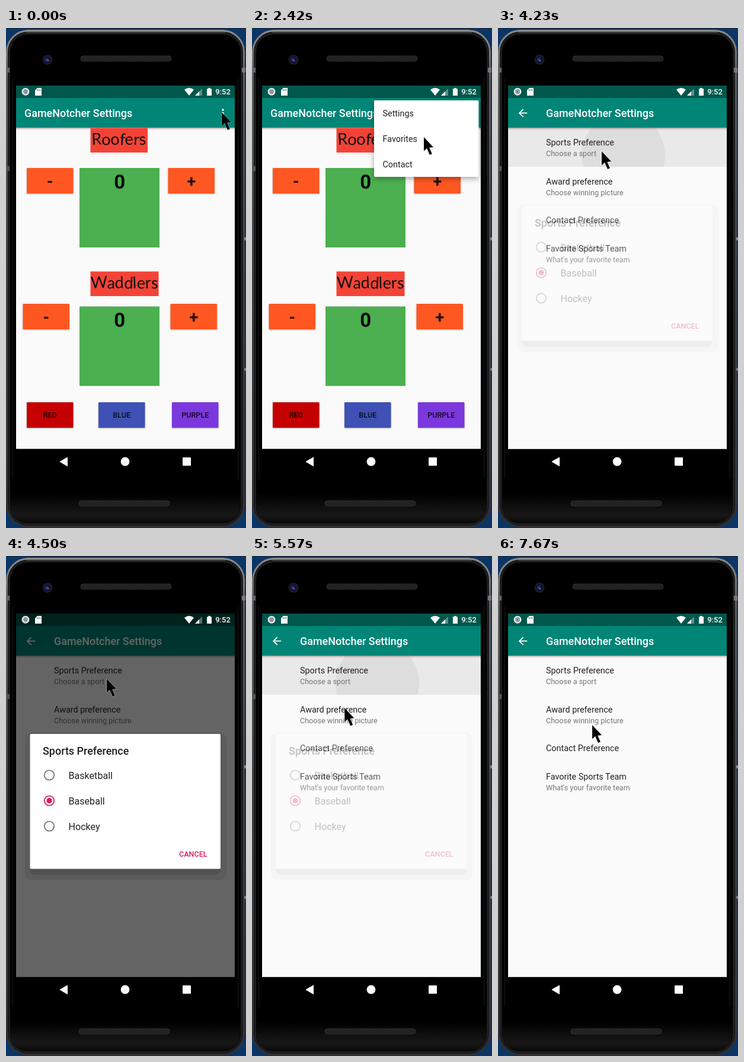
An HTML page that plays this animation: 405x843 px, repeating every 8000 ms.

```html
<!DOCTYPE html>
<html lang="en">
<head>
<meta charset="utf-8">
<title>Score app settings</title>
<style>
html, body { margin: 0; width: 100%; height: 100%; overflow: hidden; background: #0a3566; }
svg { display: block; width: 100%; height: 100%; }
text { font-family: Roboto, "Noto Sans", sans-serif; white-space: pre; }
.raised { filter: drop-shadow(0 1.5px 1.2px rgba(0,0,0,.32)); }
.popup { filter: drop-shadow(0 3px 5px rgba(0,0,0,.34)); }
.hand { font-family: Lato, "Open Sans", sans-serif; }
</style>
</head>
<body>
<svg viewBox="0 0 405 843" preserveAspectRatio="none">
  <defs>
    <linearGradient id="rim" x2="0" y2="1">
      <stop offset="0" stop-color="#8c8c8e"/>
      <stop offset=".1" stop-color="#5c5c5e"/>
      <stop offset=".5" stop-color="#404042"/>
      <stop offset="1" stop-color="#303032"/>
    </linearGradient>
    <linearGradient id="base" x2="0" y2="1">
      <stop offset="0" stop-color="#000"/>
      <stop offset=".7" stop-color="#171717"/>
      <stop offset="1" stop-color="#0a0a0a"/>
    </linearGradient>
    <linearGradient id="barShade" x2="0" y2="1">
      <stop offset="0" stop-opacity=".3"/>
      <stop offset="1" stop-opacity="0"/>
    </linearGradient>
    <pattern id="mesh" width="4" height="4" patternUnits="userSpaceOnUse">
      <rect width="4" height="4" fill="#2c2c2c"/>
      <path d="M0 0L4 4M4 0L0 4" stroke="#151515" stroke-width=".9"/>
    </pattern>
    <clipPath id="glass"><rect x="17" y="97" width="369" height="646"/></clipPath>
    <clipPath id="menuClip"><rect id="menuBox" x="190" y="110" width="210" height="170"/></clipPath>
    <clipPath id="row"><rect x="17" y="168" width="369" height="66"/></clipPath>
  </defs>
  <g id="phone"></g>
  <g clip-path="url(#glass)">
    <g id="main"></g>
    <g clip-path="url(#menuClip)"><g id="menu"></g></g>
    <g id="prefs"></g>
    <rect id="dim" x="17" y="97" width="369" height="613"/>
    <g id="dialog"></g>
  </g>
  <g id="system"></g>
  <path id="cursor" d="M0 0V23.5L5 18.8L10 30L13.8 28.3L9.2 17.8L16 17Z" stroke="#fff" stroke-width=".7" paint-order="stroke"/>
</svg>
<script>
const LOOP = 8000;
const el = id => document.getElementById(id);
const attrs = o => Object.entries(o).map(([k, v]) => ` ${k}="${v}"`).join('');
const rect = (x, y, w, h, fill, o = {}) =>
  `<rect x="${x}" y="${y}" width="${w}" height="${h}" fill="${fill}"${attrs(o)}/>`;
const circle = (x, y, r, fill, o = {}) =>
  `<circle cx="${x}" cy="${y}" r="${r}" fill="${fill}"${attrs(o)}/>`;
const path = (d, fill, o = {}) => `<path d="${d}" fill="${fill}"${attrs(o)}/>`;
const text = (s, x, y, size, fill = '#212121', o = {}) =>
  `<text x="${x}" y="${y}" font-size="${size}" fill="${fill}"${attrs(o)}>${s}</text>`;

const MEDIUM = { 'font-weight': 500 };
const MID = { 'text-anchor': 'middle' };
const TITLE = 'GameNotcher Settings';
const PINK = '#d81b60';

function appBar(titleX) {
  return rect(17, 97, 369, 612.6, '#fafafa') + rect(17, 97, 369, 21, '#00574b') +
    rect(17, 118, 369, 50, '#008577') + rect(17, 168, 369, 4, 'url(#barShade)') +
    text(TITLE, titleX, 150, 17.95, '#fff', MEDIUM);
}

function button(x, y, fill, label, bold) {
  const style = { ...MID, 'font-weight': bold ? 700 : 500 };
  return rect(x, y, 78.5, 43, fill, { class: 'raised', rx: 1 }) +
    text(label, x + 39.3, y + (bold ? 31.5 : 26), bold ? 27 : 12.57, 'rgba(0,0,0,.85)', style);
}

function team(y, name, width, scoreY, minusX, plusX, buttonY) {
  return rect(142.5, y, width, 41.5, '#f44336') +
    text(name, 142.5 + width / 2, y + 28.5, 27.2, '#111',
      { ...MID, class: 'hand', rotate: '-3 2 -2 3 -2 2 -2 2' }) +
    rect(124, scoreY, 135, 134, '#4caf50') +
    text('0', 191.7, scoreY + 34.5, 33, '#0a0a0a', { ...MID, 'font-weight': 700 }) +
    button(minusX, buttonY, '#ff5722', '-', true) +
    button(plusX, buttonY, '#ff5722', '+', true);
}

function drawPhone() {
  const speaker = (x, y) => rect(x, y, 153, 9, 'url(#mesh)', { rx: 4, stroke: '#333', 'stroke-width': .8 });
  el('phone').innerHTML =
    rect(0, 0, 405, 843, '#0a3566') +
    rect(0, 0, 405, 1, '#1b2430') +
    rect(0, 3, 403, 839, '#19191a', { rx: 38 }) +
    rect(1.5, 4.5, 400, 836, 'none', { rx: 36, stroke: 'url(#rim)', 'stroke-width': 3 }) +
    path('M34 7H371', 'none', { stroke: '#777', 'stroke-width': 1.2 }) +
    rect(6, 10, 391, 826, '#000', { rx: 31, stroke: '#303032' }) +
    path('M7 785H396V800Q396 835 361 835H42Q7 835 7 800Z', 'url(#base)') +
    path('M11.5 85V760M391.5 85V760', 'none', { stroke: '#1a1a1a' }) +
    rect(0, 67, 6, 8, '#666') + rect(0, 233, 6, 8, '#555') + rect(398, 67, 6, 8, '#777') +
    rect(402, 353, 3, 5, '#888') + rect(402, 573, 3, 5, '#777') +
    speaker(126, 47) + speaker(123, 797) +
    circle(70, 53.5, 8.5, '#1b1b20') + circle(69.5, 53.5, 5.5, '#11132c') +
    circle(69, 53.5, 2.8, '#28329a') + circle(71, 55, 1, '#8d93dd');
}

function drawMain() {
  el('main').innerHTML = appBar(31) +
    [138, 143.5, 149].map(y => circle(366, y, 1.8, '#fff')).join('') +
    team(168.5, 'Roofers', 96.5, 236, 35, 273.5, 236) +
    team(410.5, 'Waddlers', 115, 469.5, 28.5, 277.5, 465) +
    button(35, 631, '#c50000', 'RED') +
    button(156, 631, '#3f51b5', 'BLUE') +
    button(280, 631, '#7b38dd', 'PURPLE');
  el('menu').innerHTML = rect(206, 122, 176.5, 129, '#fff', { rx: 2, class: 'popup' }) +
    ['Settings', 'Favorites', 'Contact'].map((s, i) => text(s, 220.5, 148.7 + 43 * i, 14.37)).join('');
}

function drawPrefs() {
  const item = (y, title, note) => text(title, 81, y, 14.37) +
    (note ? text(note, 81, y + 18, 12.57, '#757575') : '');
  el('prefs').innerHTML = appBar(81) +
    path('M20 11H7.83l5.59-5.59L12 4l-8 8 8 8 1.41-1.41L7.83 13H20v-2z', '#fff',
      { transform: 'translate(31.2 132.6) scale(.898)' }) +
    `<g id="press" clip-path="url(#row)">${rect(17, 168, 369, 66, 'rgba(0,0,0,.065)')}` +
    `${circle(211.5, 214, 70.5, 'rgba(0,0,0,.05)')}</g>` +
    item(198, 'Sports Preference', 'Choose a sport') +
    item(263.5, 'Award preference', 'Choose winning picture') +
    item(329, 'Contact Preference') +
    item(377.3, 'Favorite Sports Team', "What's your favorite team");
}

function drawDialog() {
  const options = ['Basketball', 'Baseball', 'Hockey'].map((s, i) => {
    const y = 369.5 + 43 * i;
    const picked = i === 1;
    return circle(73, y, 8.2, 'none', { stroke: picked ? PINK : '#757575', 'stroke-width': 1.8 }) +
      (picked ? circle(73, y, 4.6, PINK) : '') + text(s, 105.5, y + 6, 16.1);
  }).join('');
  el('dialog').innerHTML =
    rect(32, 298, 340, 248.5, 'rgba(0,0,0,.08)', { rx: 11 }) +
    rect(40.5, 304, 321, 233.5, 'rgba(0,0,0,.12)', { rx: 8 }) +
    rect(40.5, 300, 321.5, 227.5, '#fff', { rx: 2 }) +
    text('Sports Preference', 62, 335, 17.95, '#212121', MEDIUM) +
    options + text('CANCEL', 292, 507, 12.57, PINK, MEDIUM);
}

function drawSystem() {
  const white = '#fff';
  el('system').innerHTML =
    circle(33, 107.3, 5.3, '#8a9aa3', { stroke: '#eef3f3', 'stroke-width': 2.2 }) +
    path('M53 101H60V114H49V105Z', white) +
    path('M52.5 103.5v2.5M55 103.5v2.5M57.5 103.5v2.5', 'none', { stroke: '#00574b' }) +
    path('M301 104Q309 98 317 104L309 114Z', white) +
    path('M319 114L331 102V114Z', 'rgba(255,255,255,.35)') +
    path('M319 114L326 107V114Z', white) +
    path('M339 102.5H341.3V101H344.7V102.5H347V114H339Z', white) +
    text('9:52', 353.2, 112, 13, white, MEDIUM) +
    path('M103.5 724V738.5L91 731.2Z', white, { stroke: white, 'stroke-linejoin': 'round' }) +
    circle(201, 731, 7.4, white) + rect(298, 724, 14, 14, white, { rx: 1 });
}

const ramp = (t, a, b) => Math.min(1, Math.max(0, (t - a) / (b - a)));
const mix = (a, b, u) => a + (b - a) * u;

// The screen refreshes in steps of about 131 ms.
const STEP = 131;
const stepTime = t => 710 + STEP * Math.floor((t - 675) / STEP);

// Pointer strokes: start, end, and where each one arrives.
const START = [364, 142];
const strokes = [
  [600, 710, 347, 141], [850, 1234, 305, 161], [1234, 1365, 291, 190],
  [1889, 2151, 231, 183], [2151, 2413, 290, 184], [2900, 3460, 217, 210],
  [4120, 4240, 175, 208], [4250, 4509, 170, 207], [5300, 5426, 164, 212],
  [5430, 6120, 122, 453], [7300, 7640, 159, 285]
];
const MENU_OPEN = 790, PREFS_OPEN = 2660;
const dialogs = [[4210, 4540], [5520, 6590]];

function pointer(t) {
  let [x, y] = START;
  for (const [from, to, endX, endY] of strokes) {
    const u = ramp(t, from, to);
    x = mix(x, endX, u);
    y = mix(y, endY, u);
  }
  return [x, y];
}

function render(time) {
  const t = stepTime(time);
  const set = (id, name, value) => el(id).setAttribute(name, value);
  const [x, y] = pointer(t);
  set('cursor', 'transform', `translate(${x} ${y})`);

  const menu = ramp(t, MENU_OPEN, MENU_OPEN + 260);
  set('menu', 'opacity', t < PREFS_OPEN ? menu : 0);
  set('menuBox', 'height', 170 * menu);

  const slide = 1 - ramp(t, PREFS_OPEN, PREFS_OPEN + 256);
  set('prefs', 'transform', `translate(0 ${33 * slide ** 3})`);
  set('prefs', 'opacity', ramp(t, PREFS_OPEN - 60, PREFS_OPEN + 140));

  let alpha = 0, dim = 0, press = 0;
  for (const [open, close] of dialogs) {
    if (t < open) continue;
    const left = 1 - ramp(t, close, close + 200);
    alpha = ramp(t, open, open + 140) * left;
    dim = .6 * ramp(t, open + 40, open + 170) * left;
    press = 1 - ramp(t, open + 40, open + 290);
  }
  set('dialog', 'opacity', alpha);
  set('dim', 'opacity', dim);
  set('press', 'opacity', press);
}

drawPhone();
drawMain();
drawPrefs();
drawDialog();
drawSystem();

function tick(now) {
  render(now % LOOP);
  requestAnimationFrame(tick);
}
render(0);
requestAnimationFrame(tick);
</script>
</body>
</html>
```
